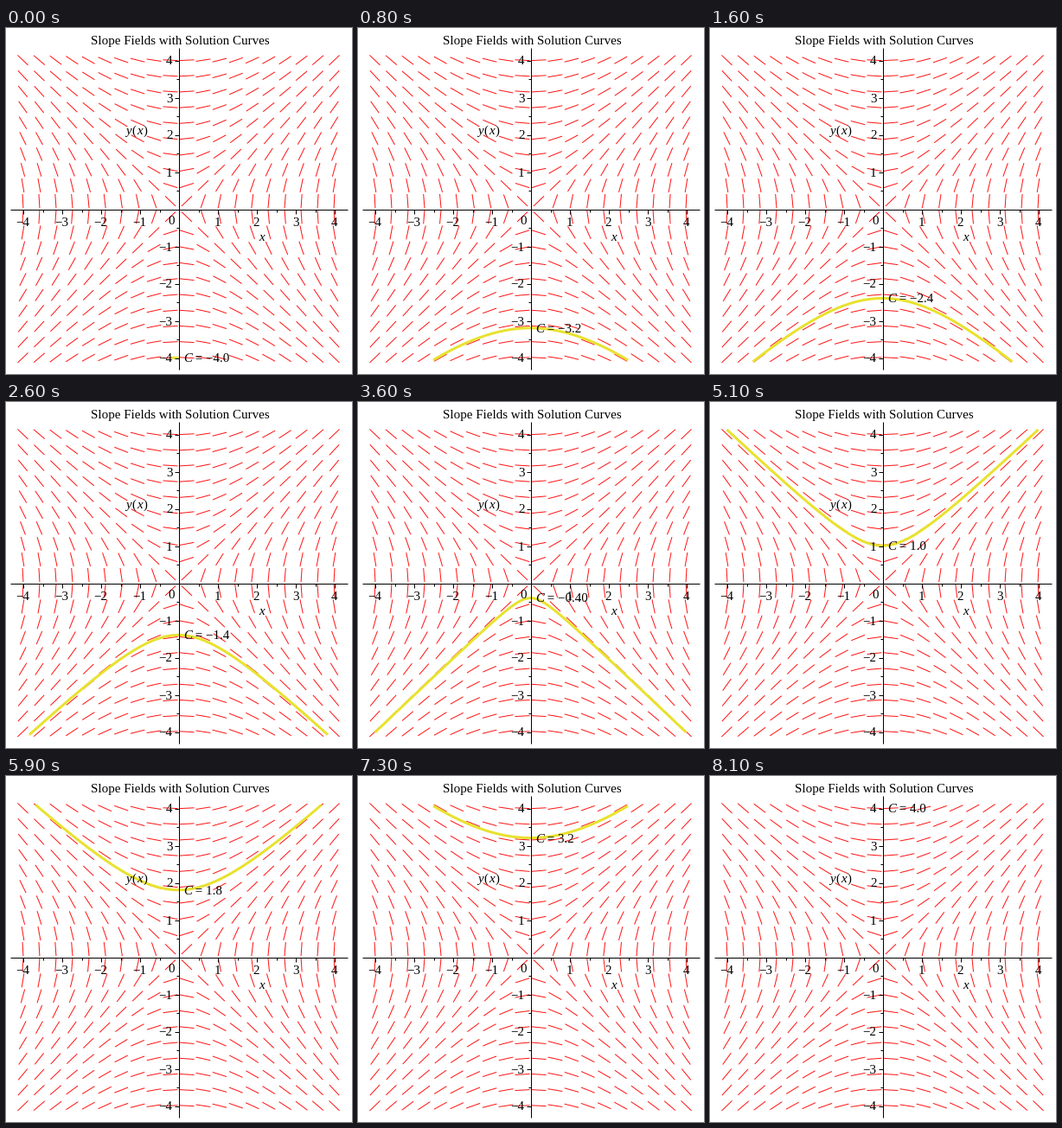
A matplotlib script that plays this animation: 400 by 400 pixels, repeating every 8.2 s.

```python
import numpy as np
import matplotlib.pyplot as plt
from matplotlib.animation import FuncAnimation
from matplotlib.collections import LineCollection

SIZE, DPI = 400, 100
X0, Y0, SX, SY = 199.5, 209.2, 45.0, 43.0
FONT_PX = 15
MINUS = "\u2212"
LIMIT = 4
STEP = 1 / 6

plt.rcParams["axes.unicode_minus"] = True


def pt(px):
    return px * 72 / DPI


def to_px(x, y):
    return X0 + SX * np.asarray(x), Y0 - SY * np.asarray(y)


fig = plt.figure(figsize=(SIZE / DPI, SIZE / DPI), dpi=DPI, facecolor="white")
ax = fig.add_axes([0, 0, 1, 1])
ax.set_xlim(0, SIZE)
ax.set_ylim(SIZE, 0)
ax.axis("off")


def write(x, baseline, text, ha="center", italic=False):
    return ax.text(x, baseline, text, ha=ha, va="baseline", color="black",
                   family="Liberation Serif", fontsize=pt(FONT_PX), zorder=5,
                   style="italic" if italic else "normal")


def line(xs, ys):
    ax.plot(xs, ys, color="black", lw=pt(1), zorder=4,
            solid_capstyle="butt")


def signed(value, text):
    return (MINUS if value < 0 else "") + text


def draw_field():
    """Slope segments of y' = x / y on a 20 by 20 grid."""
    grid = np.linspace(-LIMIT, LIMIT, 20)
    half = 0.45 * (grid[1] - grid[0])
    x, y = (a.ravel() for a in np.meshgrid(grid, grid))
    angle = np.arctan(x / y)
    dx, dy = half * np.cos(angle), half * np.sin(angle)
    start = np.column_stack(to_px(x - dx, y - dy))
    end = np.column_stack(to_px(x + dx, y + dy))
    ax.add_collection(LineCollection(np.stack([start, end], axis=1),
                                     colors="#ff1414", linewidths=pt(1),
                                     zorder=1))


def draw_axes():
    axis_x, axis_y = 199.5, 209.5
    line([5, 395], [axis_y, axis_y])
    line([axis_x, axis_x], [23, 395])
    for k in range(-8, 9):
        if k == 0:
            continue
        value = k / 2
        px, py = (np.floor(v) + 0.5 for v in to_px(value, value))
        length = 3 if k % 2 else 5
        line([px, px], [axis_y, axis_y + length])
        line([axis_x - length, axis_x], [py, py])
        if k % 2 == 0:
            label = signed(value, str(abs(k) // 2))
            write(px, 229, label)
            write(192.5, py + 5, label, ha="right")
    write(191, 227, "0")


def solution(c):
    """Branch through (0, c), ending one step after it leaves the range."""
    if c >= LIMIT:
        return [], []
    x = np.arange(25) * STEP
    y = np.hypot(c, x)
    outside = np.flatnonzero(y > LIMIT + 1e-9)
    if outside.size:
        x, y = x[:outside[0] + 1], y[:outside[0] + 1]
    if c <= -LIMIT:
        return to_px(-x, -np.abs(y))
    xs = np.concatenate([-x[:0:-1], x])
    ys = np.sign(c) * np.concatenate([y[:0:-1], y])
    return to_px(xs, ys)


def c_label(c):
    size = abs(c)
    digits = 1 if size >= 1 else 2 if size >= 0.1 else 3
    return " = " + signed(c, f"{size:.{digits}f}")


draw_field()
draw_axes()
write(201, 19, "Slope Fields with Solution Curves")
write(296, 246, "x", italic=True)
write(138, 123, "y", ha="left", italic=True)
write(145.5, 123, "(", ha="left")
write(151.5, 123, "x", ha="left", italic=True)
write(159, 123, ")", ha="left")

curve, = ax.plot([], [], color="#e8e22e", lw=pt(3), zorder=3,
                 solid_capstyle="butt", solid_joinstyle="round")
name = write(205, 0, "C", ha="left", italic=True)
reading = write(205 + 0.667 * FONT_PX, 0, "", ha="left")

# The equation is singular at zero, so the sweep steps around it.
tenths = np.arange(1, 41) / 10
constants = np.concatenate([-tenths[::-1], [-0.01, 0.01], tenths])


def update(frame):
    c = constants[frame]
    curve.set_data(*solution(c))
    baseline = float(to_px(0, c)[1]) + 5
    name.set_y(baseline)
    reading.set_y(baseline)
    reading.set_text(c_label(c))
    return curve, name, reading


anim = FuncAnimation(fig, update, frames=len(constants), interval=100,
                     init_func=lambda: update(0), repeat=True, repeat_delay=0)
plt.show()
```
